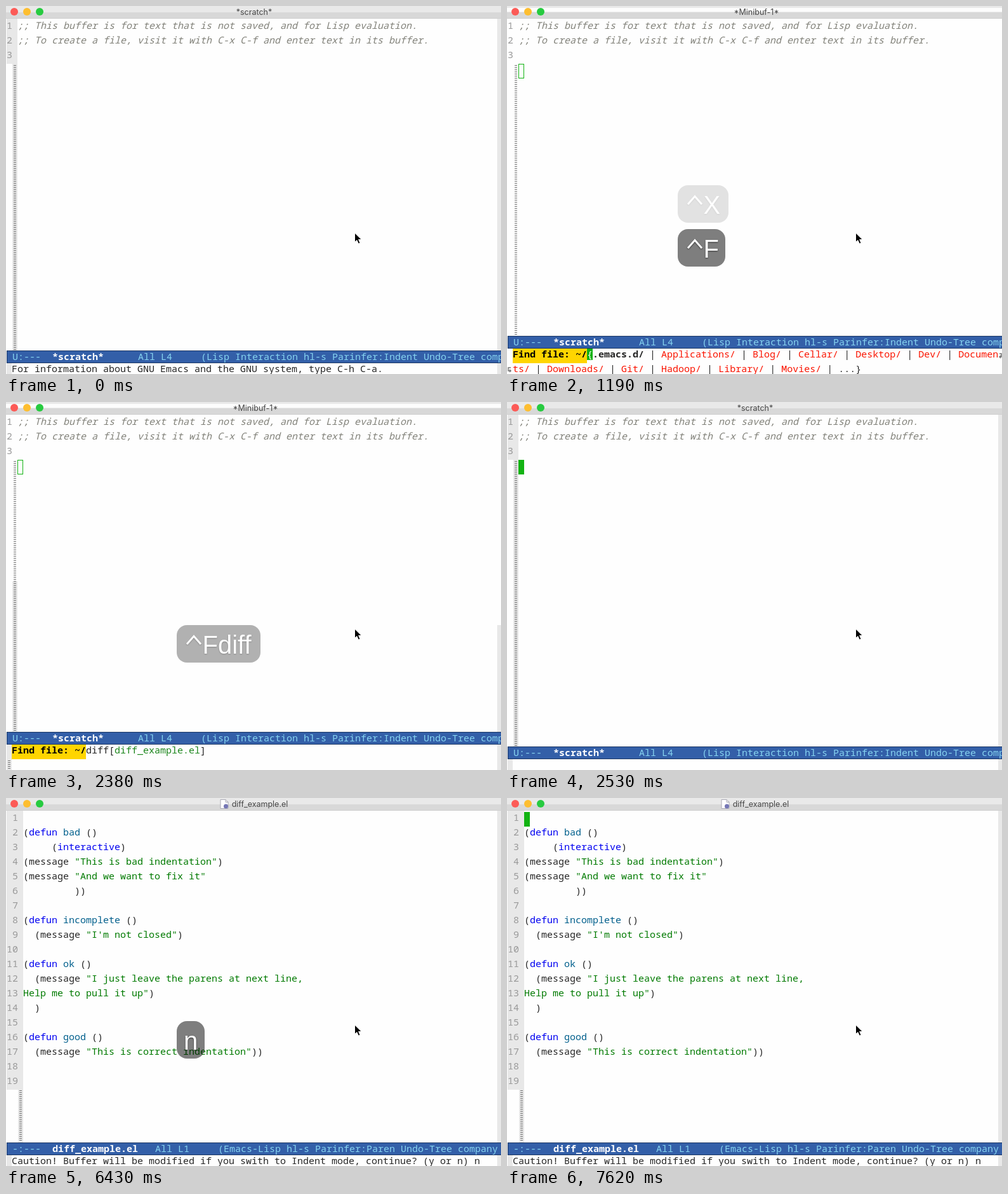
Recreate the animation shown at these times as an HTML page. Size 780x579 px, loop 8000 ms.

```html
<!DOCTYPE html>
<html lang="en">
<head>
<meta charset="utf-8">
<title>Editor session</title>
<style>
  html, body { margin: 0; width: 100%; height: 100%; overflow: hidden; background: #fff; }
  svg { display: block; width: 780px; height: 579px; }
  text { font: 15px "Noto Sans Mono", "DejaVu Sans Mono", monospace; fill: #262626; white-space: pre; }
  .title { font: 12.5px Inter, "Liberation Sans", sans-serif; fill: #464646; }
  .num { fill: #999; }
  .comment { fill: #82827a; font-style: italic; }
  .key { fill: #0000f0; }
  .fn { fill: #005f8c; }
  .str { fill: #007a00; }
  .dir { fill: #fa1400; }
  .match { fill: #1c861c; }
  .bold { font-weight: 700; }
  .prompt { font-weight: 700; fill: #000; }
  .inv { fill: #fff; }
  .mode { fill: #86d3f0; }
  .buf { font-weight: 700; fill: #fff; }
  .bubble text { font: 40px "Liberation Sans", Arial, sans-serif; fill: #fff; }
  .glyphs { filter: drop-shadow(0 1.5px 1px rgba(0, 0, 0, .55)); }
</style>
</head>
<body>
<svg id="stage" viewBox="0 0 780 579" xml:space="preserve"></svg>
<script>
const LOOP = 8000, CELL = 9, LINE = 23;
const GRAY = '#e8e8e8', GREEN = '#12b312', GOLD = '#ffd500';

const rect = (x, y, w, h, fill, more = '') =>
  `<rect x="${x}" y="${y}" width="${w}" height="${h}" fill="${fill}" ${more}/>`;
const text = (x, y, body, cls = '', more = '') =>
  `<text x="${x}" y="${y}" class="${cls}" ${more}>${body}</text>`;
const span = cls => body => `<tspan class="${cls}">${body}</tspan>`;
const [key, fn, str, dir, match, bold, inv, buf] =
  ['key', 'fn', 'str', 'dir', 'match', 'bold', 'inv', 'buf'].map(span);

// Shown only during the listed "from-to" spans, in ms.
const during = (spans, body) => `<g data-on="${spans}">${body}</g>`;

const dots = (x, top, bottom) =>
  `<path d="M${x} ${top}V${bottom}" stroke="#747474" stroke-width="4" stroke-dasharray="1 2"/>`;

const numbers = (count, width) => Array.from({ length: count }, (_, i) =>
  text(1, 36 + i * LINE, String(i + 1).padStart(width), 'num')).join('');

const title = (name, x = 391) => text(x, 14, name, 'title', 'text-anchor="middle"');

const modeline = (y, body) =>
  rect(1.5, y + .5, 790, 19, '#335fa8', 'stroke="#1c3764"') + text(10, y + 15, body, 'mode');

const scratchMode = y => modeline(y,
  `U:---  ${buf('*scratch*')}      All L4     (Lisp Interaction hl-s Parinfer:Indent Undo-Tree comp`);

const solid = (x, y, h = LINE) => rect(x, y, CELL, h, GREEN);
const hollow = `<rect x="18.5" y="91.5" width="8" height="22" fill="none" stroke="${GREEN}"/>`;

const echoSides = rect(1, 562, 8, 17, GRAY) + rect(774, 562, 6, 17, GRAY);
const rightEdge = rect(774, 20, 6, 522, GRAY);

const caution = 'Caution! Buffer will be modified if you swith to Indent mode, continue? (y or n) ';

// Minibuffer prompt: typed text, then a bracket that carries the cursor, then the choices.
function findFile(typed, bracket, choices, lit = true) {
  const x = 126 + typed.length * CELL;
  return rect(9, 539, 117, LINE, GOLD) + text(9, 553, 'Find file: ~/', 'prompt') +
    text(126, 553, typed) + (lit ? solid(x, 539, 18) : '') +
    text(x, 553, (lit ? inv(bracket) : bracket) + choices);
}

const caret = '<path d="M285 381L296 368.5L307 381" fill="none" stroke="#fff" stroke-width="3"/>';

function bubble(label, width, opacity = 1, y = 351) {
  const control = label[0] === '^';
  const glyphs = control
    ? caret + text(309.5, 396, label.slice(1))
    : text(280, 396, label);
  return `<g class="bubble" opacity="${opacity}" transform="translate(0 ${y - 351})">` +
    rect(269, 351, width, 59, 'rgba(0,0,0,.5)', 'rx="16"') + `<g class="glyphs">${glyphs}</g></g>`;
}

const wrapArrows = `<g fill="none" stroke="#777" stroke-width="1.5">
  <path d="M776 547h3v5h-3m2 -2l-2 2l2 2"/><path d="M6 569h-4v5h4m-2 -2l2 2l-2 2"/></g>`;

const dirs = names => names.split(' ').map(n => dir(n + '/')).join(' | ');

const scratchText =
  text(18, 36, ';; This buffer is for text that is not saved, and for Lisp evaluation.', 'comment') +
  text(18, 59, ';; To create a file, visit it with C-x C-f and enter text in its buffer.', 'comment') +
  numbers(3, 1);

const code = [
  '',
  `(${key('defun')} ${fn('bad')} ()`,
  `     (${key('interactive')})`,
  `(message ${str('"This is bad indentation"')})`,
  `(message ${str('"And we want to fix it"')}`,
  '         ))',
  '',
  `(${key('defun')} ${fn('incomplete')} ()`,
  `  (message ${str('"I\'m not closed"')})`,
  '',
  `(${key('defun')} ${fn('ok')} ()`,
  `  (message ${str('"I just leave the parens at next line,')}`,
  `${str('Help me to pull it up"')})`,
  '  )',
  '',
  `(${key('defun')} ${fn('good')} ()`,
  `  (message ${str('"This is correct indentation"')})`.concat(')')
].map((line, i) => text(27, 36 + i * LINE, line)).join('');

const icon = `<path d="M338 2.5h8l4 4v10h-12z" fill="#fff" stroke="#a9a9b4"/>
  <path d="M346 2.5v4h4" fill="none" stroke="#a9a9b4"/><circle cx="346.5" cy="13" r="3.5" fill="#7577b5"/>`;

const titleBar = rect(0, 0, 780, 10, '#e9e9e9') + rect(0, 10, 780, 9, '#d8d8d8') +
  rect(0, 19, 780, 1, '#cfcfcf') + during('740-2530', rect(0, 3, 780, 6, '#fcfcfc')) +
  ['#fc5b57', '#fdbe30', '#27cb40'].map((c, i) =>
    `<circle cx="${13 + i * 20}" cy="9" r="6" fill="${c}"/>`).join('');

const pointer = `<path d="M549.5 357v14.5l3.4-3l2.5 5.6l2.6-1.1l-2.4-5.5h4.6z"
  fill="#000" stroke="#fff" stroke-width="1"/>`;

const scratch = during('0-6430',
  during('0-740 2530-6430',
    rect(1, 20, 17, 71, GRAY) + rect(10, 91, 8, 451, GRAY) + rightEdge + echoSides +
    dots(14, 93, 541) + title('*scratch*') + scratchMode(542)) +
  during('740-2530',
    during('1340-2530', rect(10, 282, 8, 237, GRAY)) +
    during('1490-2530', rect(774, 351, 6, 228, GRAY) + rect(1, 539, 8, 40, GRAY) + dots(5, 564, 579)) +
    dots(14, 93, 518) + title('*Minibuf-1*', 393) + scratchMode(519)) +
  scratchText +
  during('450-740 2530-3580', solid(18, 91)) +
  during('740-2530 3580-6430', hollow));

const echo =
  during('0-600', text(9, 576, 'For information about GNU Emacs and the GNU system, type C-h C-a.')) +
  during('740-1340',
    findFile('', '{', `${bold('.emacs.d/')} | ${dirs('Applications Blog Cellar Desktop Dev')} | ${dir('Documen')}`) +
    text(9, 576, `${dir('ts/')} | ${dirs('Downloads Git Hadoop Library Movies')} | ...}`)) +
  during('1340-1490',
    findFile('d', '{', `${bold('Desktop/')} | ${dirs('Dev Documents Downloads .emacs.d')} | diff_example.e`) +
    text(9, 576, `l | ${dir('Hadoop/')} | ...}`)) +
  during('740-1490', wrapArrows) +
  during('1490-1630',
    findFile('di', '{', `${bold('diff_example.el')} | .CFUserTextEncoding | .rediscli_history}`)) +
  during('1630-1780', findFile('dif', '[', match('diff_example.el') + ']')) +
  during('1780-2230', findFile('diff', '[', match('diff_example.el') + ']')) +
  during('2230-2530', findFile('diff', '[', match('diff_example.el') + ']', false)) +
  during('3580-6430',
    rect(9, 562, 729, 17, GOLD) + text(9, 576, caution, 'prompt') + solid(738, 562, 17));

const file = during('6430-8000',
  rect(1, 20, 26, 439, GRAY) + rect(19, 459, 8, 83, GRAY) + rightEdge + echoSides +
  dots(23, 460, 541) + icon + title('diff_example.el', 400) + numbers(19, 2) + code +
  during('6570-7020 7620-8000', solid(27, 22)) +
  modeline(542, `-:---  ${buf('diff_example.el')}   All L1     (Emacs-Lisp hl-s Parinfer:Paren Undo-Tree company`) +
  text(9, 576, caution + 'n'));

const keys =
  during('600-740', bubble('^X', 80)) +
  during('740-1190', bubble('^X', 80, 1, 282)) +
  during('1190-1340', bubble('^X', 80, .22, 282)) +
  during('740-1340', bubble('^F', 75)) +
  during('1340-1490', bubble('^Fd', 98)) +
  during('1490-1630', bubble('^Fdi', 107)) +
  during('1630-1780', bubble('^Fdif', 120)) +
  during('1780-2380', bubble('^Fdiff', 132)) +
  during('2380-2530', bubble('^Fdiff', 132, .6)) +
  during('6430-6870', bubble('n', 44)) +
  during('6870-7020', bubble('n', 44, .6)) +
  during('7020-7170', bubble('n', 44, .22));

const stage = document.getElementById('stage');
stage.innerHTML = rect(0, 0, 780, 579, '#fefefe') + titleBar + scratch + file + echo + keys + pointer;

const parts = [...stage.querySelectorAll('[data-on]')].map(el => ({
  el, spans: el.dataset.on.split(' ').map(s => s.split('-').map(Number))
}));

const start = performance.now();
function draw() {
  const t = Math.max(0, performance.now() - start) % LOOP;
  for (const { el, spans } of parts) {
    el.style.display = spans.some(([a, b]) => t >= a && t < b) ? '' : 'none';
  }
  requestAnimationFrame(draw);
}
draw();
</script>
</body>
</html>
```
